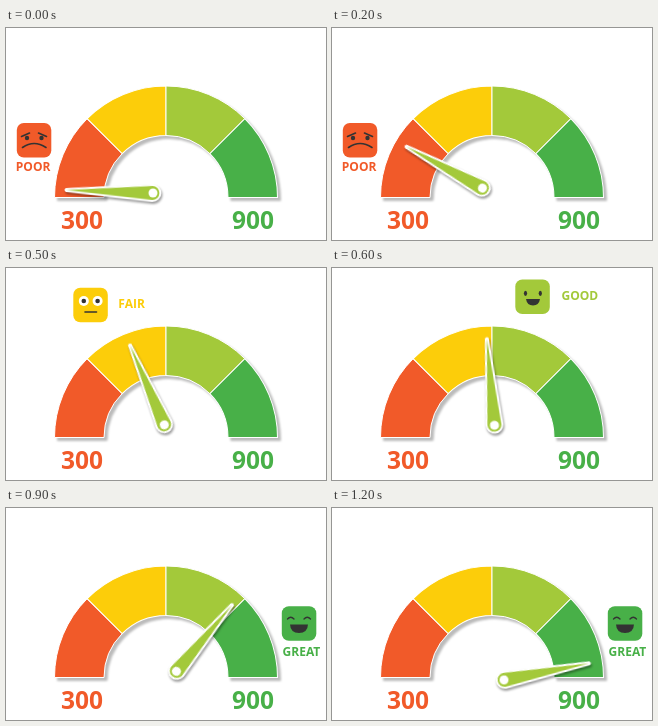
An HTML page for the animation above (1910 ms loop, 320 by 212 pixels).

```html
<!DOCTYPE html>
<html lang="en">
<head>
<meta charset="utf-8">
<title>Score gauge</title>
<style>
  html, body { margin: 0; width: 100%; height: 100%; overflow: hidden; background: #fff; }
  svg { display: block; width: 100vw; height: 100vh; }
  text { font: 700 12px "Open Sans", sans-serif; }
  .limit { font-size: 24.5px; text-anchor: middle; }

  .orange { fill: #f15a29; }
  .yellow { fill: #fccd0a; }
  .lime { fill: #a3c93a; }
  .green { fill: #48b048; }
  .dark { fill: #333; }
  .line { fill: none; stroke: #333; stroke-width: 1.6; stroke-linecap: round; }

  .dial { filter: drop-shadow(3px 3px 1px #0004); }
  .dial path { stroke: #fff; stroke-width: 1; }
  .shade { filter: drop-shadow(1.5px 2px 1.2px #0006); }

  .needle, .mood { animation: 1910ms step-end infinite; }
  .needle { transform-origin: 159.1px 169.9px; animation-name: sweep; }
  .mood { visibility: hidden; }
  .poor { animation-name: poor; }
  .fair { animation-name: fair; }
  .good { animation-name: good; }
  .great { animation-name: great; }

  /* one step every 100 ms, then a long rest */
  @keyframes sweep {
    0% { transform: rotate(0deg); }
    5.235% { transform: rotate(13.3deg); }
    10.471% { transform: rotate(26.6deg); }
    15.706% { transform: rotate(42.3deg); }
    20.942% { transform: rotate(53.5deg); }
    26.178% { transform: rotate(64.7deg); }
    31.413% { transform: rotate(83deg); }
    36.649% { transform: rotate(97deg); }
    41.884% { transform: rotate(111.3deg); }
    47.12% { transform: rotate(128deg); }
    52.356% { transform: rotate(142.7deg); }
    57.591% { transform: rotate(155deg); }
    62.827%, 100% { transform: rotate(167deg); }
  }
  @keyframes poor {
    0% { visibility: visible; }
    15.706%, 100% { visibility: hidden; }
  }
  @keyframes fair {
    0% { visibility: hidden; }
    15.706% { visibility: visible; }
    31.413%, 100% { visibility: hidden; }
  }
  @keyframes good {
    0% { visibility: hidden; }
    31.413% { visibility: visible; }
    47.12%, 100% { visibility: hidden; }
  }
  @keyframes great {
    0% { visibility: hidden; }
    47.12%, 100% { visibility: visible; }
  }
</style>
</head>
<body>
<svg viewBox="0 0 320 212">
  <defs>
    <path id="slice" d="M-111.5 0A111.5 111.5 0 0 1 -78.84 -78.84L-43.84 -43.84A62 62 0 0 0 -62 0Z"/>
    <rect id="tile" width="34.5" height="34.5" rx="7"/>
  </defs>

  <g class="dial" transform="translate(160 169.5)">
    <path class="orange" d="M-111.5 0A111.5 111.5 0 0 1 -78.84 -78.84L-43.84 -43.84A62 62 0 0 0 -62 0Z"/>
    <path class="yellow" transform="rotate(45)" d="M-111.5 0A111.5 111.5 0 0 1 -78.84 -78.84L-43.84 -43.84A62 62 0 0 0 -62 0Z"/>
    <path class="lime" transform="rotate(90)" d="M-111.5 0A111.5 111.5 0 0 1 -78.84 -78.84L-43.84 -43.84A62 62 0 0 0 -62 0Z"/>
    <path class="green" transform="rotate(135)" d="M-111.5 0A111.5 111.5 0 0 1 -78.84 -78.84L-43.84 -43.84A62 62 0 0 0 -62 0Z"/>
  </g>

  <text class="limit orange" x="76" y="201">300</text>
  <text class="limit green" x="247" y="201">900</text>

  <g class="shade">
    <g class="needle">
      <g transform="translate(147 165) rotate(1.95)">
        <path class="lime" d="M-86.5 0L-.6 -7A7 7 0 1 1 -.6 7Z" stroke="#fff" stroke-width="4" stroke-linejoin="round" paint-order="stroke"/>
        <circle r="4.5" fill="#fff"/>
      </g>
    </g>
  </g>

  <g class="mood poor">
    <use href="#tile" class="orange" x="10.8" y="95"/>
    <path class="line" d="M15.5 108.5L23.5 105M32.5 105L40.5 108.5"/>
    <circle class="dark" cx="21" cy="110" r="2.2"/>
    <circle class="dark" cx="35.5" cy="110" r="2.2"/>
    <path class="line" stroke-width="2" d="M16.5 119.5Q28 111.5 40 119.5"/>
    <text class="orange" x="9.8" y="143.3">POOR</text>
  </g>

  <g class="mood fair">
    <use href="#tile" class="yellow" x="67.3" y="19.8"/>
    <circle cx="77.8" cy="33" r="5" fill="#fff"/>
    <circle cx="91.6" cy="33" r="5" fill="#fff"/>
    <circle class="dark" cx="77.8" cy="33" r="2.3"/>
    <circle class="dark" cx="91.6" cy="33" r="2.3"/>
    <path class="line" d="M79 44H90.5"/>
    <text class="yellow" x="112.3" y="39.7">FAIR</text>
  </g>

  <g class="mood good">
    <use href="#tile" class="lime" x="183.3" y="11.5"/>
    <ellipse class="dark" cx="193.5" cy="25.3" rx="1.6" ry="2.6"/>
    <ellipse class="dark" cx="208.3" cy="25.3" rx="1.6" ry="2.6"/>
    <path class="dark" d="M194 31H208Q207 37.5 201 37.5T194 31Z"/>
    <text class="lime" x="229.5" y="32">GOOD</text>
  </g>

  <g class="mood great">
    <use href="#tile" class="green" x="275.8" y="98.2"/>
    <path class="line" style="stroke-width:1.3" d="M281.5 111Q284.7 107.5 288 111M298 111Q301.2 107.5 304.5 111"/>
    <path class="dark" d="M284 116.5H302Q301.5 125 293 125T284 116.5Z"/>
    <text class="green" x="276.6" y="148.2">GREAT</text>
  </g>
</svg>
</body>
</html>
```
